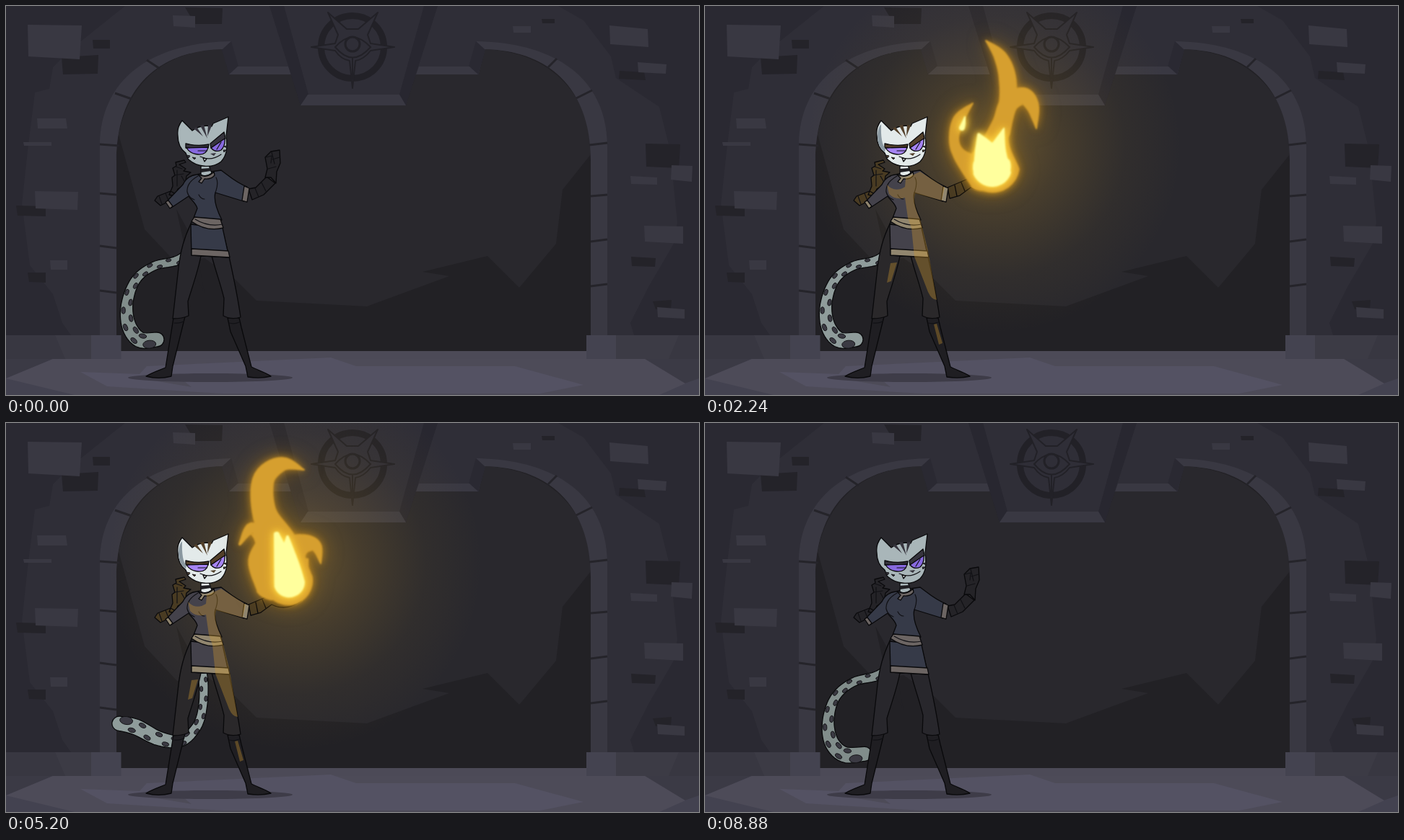
Recreate the animation shown at these times as an HTML page. Size 960 by 540 pixels, loop 8.96 s.

```html
<!DOCTYPE html>
<html lang="en">
<head>
<meta charset="utf-8">
<title>Fire spell</title>
<style>
html, body { margin: 0; width: 100%; height: 100%; overflow: hidden; background: #2f2e37; }
svg { display: block; width: 100vw; height: 100vh;
  --fur: #a9b6b9; --eye: #8769df; --cloth: #363a48; --trim: #6c6563;
  --glove: #242327; --mark: #36343d; --pants: #28272c; --tail: #818d8b; }
svg.lit { --fur: #e3eaea; --eye: #a684f4; --cloth: #44424b; --trim: #91866f;
  --glove: #493b22; --mark: #53402a; --pants: #2a282a; --tail: #8f9c9b; }
.lite { fill: #393842; } .dim { fill: #2a2932; } .dark { fill: #242329; }
.line { stroke: #09090b; stroke-width: 1.3; stroke-linejoin: round; stroke-linecap: round; }
.thin { fill: none; stroke: #111115; stroke-width: 1.2; stroke-linecap: round; }
.fur { fill: var(--fur); } .eye { fill: var(--eye); } .cloth { fill: var(--cloth); }
.trim { fill: var(--trim); } .glove { fill: var(--glove); } .mark { fill: var(--mark); }
.pants { fill: var(--pants); } .boot { fill: #1f1e22; } .tail { fill: var(--tail); }
#warm, #glow, #fire, #smoke { visibility: hidden; }
#flame { fill: #d69f2f; filter: blur(.8px) drop-shadow(0 0 5px #c58c1dcc) drop-shadow(0 0 12px #a9771599); }
#core { fill: #ffff9d; filter: blur(1px) drop-shadow(0 0 4px #ffe04a) drop-shadow(0 0 7px #ffc52d); }
</style>
</head>
<body>
<svg id="stage" viewBox="0 0 960 540" preserveAspectRatio="none">
<defs>
  <radialGradient id="halo">
    <stop offset="0" stop-color="#ffbe30" stop-opacity=".3"/>
    <stop offset=".35" stop-color="#f0b32c" stop-opacity=".15"/>
    <stop offset=".7" stop-color="#d8a82c" stop-opacity=".045"/>
    <stop offset="1" stop-color="#d8a82c" stop-opacity="0"/>
  </radialGradient>
</defs>

<g id="room">
  <path fill="#2f2e37" d="M0 0H960V540H0z"/>
  <path class="dim" d="M0 0H165L105 48 75 75 65 85 60 115 40 120 30 200 22 275 33 360 65 400 78 440 90 457H0zM765 0H960V457H870L865 440 890 390 925 330 930 300 920 200 905 140 845 100 838 70 800 20z"/>
  <path fill="#222125" d="M153 480V215C153 120 205 62 300 60L309 95H395L408 138H554L568 95H655L664 60C758 62 810 120 810 215V480z"/>
  <path fill="#29282d" d="M156 178C170 110 215 62 300 60L309 95H395L408 138H554L568 95H655L664 60C752 64 810 120 810 206L771 255 762 330 711 391 667 347 577 369 614 375 500 417 347 409 318 380 275 350 237 358 192 310z"/>
  <path fill="#222125" d="M236 282 262 330 275 398 253 360z"/>
  <g id="arch">
    <path class="lite" d="M130 457V195C130 108 192 51 312 49L300 60C205 62 153 120 153 215V457z"/>
    <path class="dim" d="M312 49 322 84 309 95 299 61z"/>
    <path class="lite" d="M321 84H391L395 95H309z"/>
  </g>
  <use href="#arch" transform="matrix(-1 0 0 1 963 0)"/>
  <path stroke="#25242a" stroke-width="3" d="M195 75 213 87M151 121 174 129M130 192 157 194M130 260 153 262M130 333 153 336M130 395 153 398M750 86 763 73M790 128 812 117M808 193 833 190M810 264 833 262M810 327 833 324M810 389 833 386"/>
  <path fill="#2f2e37" d="M385 0H579L545 123H418z"/>
  <path fill="#282730" d="M365 0H385L419 123 408 138zM579 0H598L554 138 545 123z"/>
  <path class="lite" d="M418 123H545L554 138H408z"/>
  <circle cx="480" cy="57" r="43.5" fill="none" stroke="#222127" stroke-width="9"/>
  <path fill="#2f2e37" stroke="#222127" stroke-width="2" stroke-linejoin="round" d="M423 57 456 52 460 40 446 9 472 32 488 32 515 9 501 40 505 52 538 57 505 62Q496 74 484 76L480 114 476 76Q464 74 456 62z"/>
  <path fill="none" stroke="#222127" stroke-width="2" d="M456 57Q480 30 505 57 480 86 456 57zM480 71V102"/>
  <circle cx="480" cy="53" r="10" fill="#2f2e37" stroke="#222127" stroke-width="3"/>
  <path class="dark" d="M77 71 128 68 127 94 79 95zM248 2 300 3 299 25 262 25zM120 47H144V59H121zM14 277 55 278V292L16 291zM30 370H55V384L32 383zM742 18H760V24H743zM850 90 884 92 886 103 849 101zM886 191 934 192 932 225 887 223zM866 348 900 350 899 362 867 361zM896 410 922 408 921 420 900 421z"/>
  <path class="lite" d="M30 26 105 27 102 74 31 70zM231 13 262 14V30L232 28zM43 156H83L85 170H44zM24 189H63V194H25zM40 257 100 258 99 283 41 281zM61 353H85V366H62zM702 28H727V37H703zM836 27 889 32 890 57 837 53z"/>
  <path class="lite" d="M875 78 915 81 914 94 876 92zM922 221 951 222 950 244 921 241zM865 236 902 238V248L866 247zM884 305 938 306V330L885 327zM902 418 940 421V434L903 432z"/>
  <path fill="#434250" d="M0 490H960V540H0z"/>
  <path fill="#383741" d="M0 457H130V490H0zM833 457H960V490H833z"/>
  <path fill="#3c3b45" d="M68 457H118V490H82zM845 457H932L918 490H845z"/>
  <path fill="#4c4a57" d="M159 479H804V491H159z"/>
  <path fill="#444350" d="M118 457H159.500V490H118zM804 457H845V490H804z"/>
  <path fill="#3b3a45" d="M0 490H65L0 517zM885 490H960V517L940 524z"/>
  <path fill="#4d4b58" d="M0 517 65 490H885L941 524 905 540H95z"/>
  <path fill="#545263" d="M103 508 185 511 195 500 450 488 485 500H705L800 526 740 538H300L140 528z"/>
  <path fill="#4d4b58" d="M210 521 247 521 257 529z"/>
  <ellipse cx="283" cy="516" rx="114" ry="6" fill="#3e3c48"/>
</g>

<circle id="glow" cx="400" cy="195" r="260" fill="url(#halo)"/>

<g id="smoke">
  <path id="ribbon" fill="#55505f"/>
  <g fill="#3d3848">
    <ellipse cx="337" cy="113" rx="29" ry="15" transform="rotate(32 337 113)"/>
    <ellipse cx="348" cy="89" rx="11" ry="7"/>
    <ellipse cx="371" cy="141" rx="14" ry="8" transform="rotate(25 371 141)"/>
    <ellipse cx="453" cy="82" rx="20" ry="13" transform="rotate(-35 453 82)"/>
    <ellipse cx="450" cy="43" rx="18" ry="10" transform="rotate(-35 450 43)"/>
    <ellipse cx="407" cy="50" rx="13" ry="5" transform="rotate(25 407 50)"/>
    <ellipse cx="447" cy="7" rx="19" ry="14"/>
    <ellipse cx="324" cy="8" rx="28" ry="10" transform="rotate(15 324 8)"/>
    <ellipse cx="396" cy="31" rx="5" ry="3"/>
  </g>
</g>

<path id="tail" class="tail line"/>
<path id="spots" fill="#3b3a43" stroke="#141417" stroke-width="1"/>

<g id="cat">
  <path class="boot line" d="M232 433 248 431 231 500 229 514C218 517 205 517 194 514 204 508 214 505 221 502zM307 433 323 433 326 446 340 501C350 506 360 509 367 514 355 517 342 516 335 515L332 500 311 452z"/>
  <path class="thin" d="M233 440Q242 441 247 437M309 440Q316 442 323 439"/>
  <path class="pants line" d="M259 296C247 320 241 340 238 372L231 434Q244 434 253 430L252 410C258 390 266 368 270 347L285 347C291 370 298 388 302 406L301 430Q312 436 325 432C321 404 315 375 309 348L298 303z"/>
  <path class="cloth line" d="M256 303 300 308 309 349 257 346z"/>
  <path class="trim line" d="M257 337 308 340 310 349 257 346z"/>
  <path class="glove line" d="M206 270 210 264 228 257 237 262 222 273 214 277zM226 262 231 250 230 238 234 235 231 225 236 222 235 217 247 214 249 217 240 220 249 226 246 229 256 231 250 236 248 248 238 254 234 264z"/>
  <path class="thin" d="M212 264 216 275M221 260 225 270M235 223 244 226M233 235 246 233M237 228V250M243 236 247 243"/>
  <g id="fist">
    <path class="glove line" d="M336 254 346 252 361 237 373 246 357 262 341 269z"/>
    <path class="glove line" d="M359 238 362 226 359 210 367 202 379 200 380 218 375 230 374 246 367 238z"/>
    <path class="thin" d="M345 253 350 265M354 245 360 257M360 210 368 208 367 218M368 203 372 219M379 210 369 213M363 226 374 223"/>
    <path id="soot" opacity="0" d="M346 252 361 237 362 226 359 208 367 201 379 200 380 218 375 230 375 246 357 262 350 264z"/>
  </g>
  <path id="open" class="glove line" d="M336 252 364 240Q385 250 405 242L409 247Q388 262 368 252L353 263 339 267zM346 249 349 264M355 245 360 257"/>
  <path class="cloth line" d="M264 234C254 235 249 240 245 248L222 272 229 280 253 264C256 269 263 273 265 281L260 294 299 297C292 283 287 270 290 259L329 271 334 251C320 246 310 237 298 228L284 230z"/>
  <path class="trim line" d="M221 272 225 270 231 278 227 281zM330 250 337 253 334 272 327 270zM261 293 297 296 301 308Q278 314 257 299z"/>
  <path class="thin" d="M262 296Q280 307 300 303M266 236Q250 245 251 258 253 266 261 269M267 262Q270 268 275 268M290 259Q295 246 291 238"/>
  <path class="fur line" d="M270 222 281 221 285 232Q277 238 270 234z"/>
  <path class="boot" d="M269 226 283 225 284 229 270 231z"/>
  <path class="trim line" d="M266 234Q279 240 288 230L289 235Q284 241 275 240L271 246 267 244 271 239z"/>
  <path class="fur line" d="M238 180C237 172 240 164 244 159L258 173Q270 164 285 167L287 163 308 154 305 180C307 197 306 207 298 216 286 226 263 224 252 212L249 204Q238 196 238 180z"/>
  <path class="mark" d="M260 170 264 168 273 181zM269 166 274 165 279 184zM280 165 285 166 279 181z"/>
  <path class="mark line" d="M249 191Q265 195 281 192L280 197 249 197zM283 191 302 175 304 184 284 197z"/>
  <path class="eye line" d="M250 197 280 196Q278 207 266 206 255 205 250 197zM284 197 303 184Q304 194 298 200 290 204 284 197z"/>
  <path class="thin" d="M266 201 278 201M292 199 298 189M269 209Q284 216 298 206"/>
  <path class="mark" d="M283 205 291 204 288 208z"/>
  <path class="mark" stroke="#19191c" d="M250 207 255 208 253 211zM258 210 263 211 261 213zM302 195 306 194V197zM301 200 305 200 302 203z"/>
  <path class="line" fill="#eef2f2" stroke-width=".8" d="M273 211 275 216 278 212z"/>
  <g id="warm">
    <path fill="#8a98a0" d="M239 181Q239 195 249 203L250 198Q243 191 244 164 239 169 239 181z"/>
    <path fill="#c9952f" fill-opacity=".36" d="M252 248Q263 260 277 251L278 239 298 230 332 252 328 270 291 260Q287 274 298 296L309 340 321 408Q314 408 309 397L290 348 286 308 281 294 277 266Q264 270 255 261zM257 357 266 356 258 382 252 384zM317 442 321 441 329 468 324 470z"/>
  </g>
</g>

<g id="fire"><g id="flame"></g><g id="core"></g><g id="embers" fill="#c28f26"></g></g>
</svg>

<script>
const LOOP = 8960, STEP = 80, TAIL_LOOP = 2240, FIRE_LOOP = 560;
const $ = id => document.getElementById(id);
const nums = text => text.split(/[ ,]+/).map(Number);
const clamp = v => Math.max(0, Math.min(1, v));
const mix = (a, b, u) => a + (b - a) * u;
const show = (id, on) => $(id).style.visibility = on ? 'visible' : 'hidden';

function addPath(parent) {
  const path = document.createElementNS('http://www.w3.org/2000/svg', 'path');
  return parent.appendChild(path);
}

const spline = (a, b, c, d, u) =>
  b + u / 2 * (c - a + u * (2 * a - 5 * b + 4 * c - d + u * (3 * (b - c) + d - a)));

// Points are [x, y, halfWidth]; u runs from 0 to 1 along the curve.
function along(points, u) {
  const last = points.length - 1;
  const i = Math.min(last - 1, Math.floor(u * last));
  const at = j => points[Math.max(0, Math.min(last, j))];
  return [0, 1, 2].map(k => spline(at(i - 1)[k], at(i)[k], at(i + 1)[k], at(i + 2)[k], u * last - i));
}

function frameAt(points, u) {
  const [x, y, w] = along(points, u);
  const p = along(points, Math.max(0, u - .01)), q = along(points, Math.min(1, u + .01));
  return { x, y, w: Math.max(.3, w), a: Math.atan2(q[1] - p[1], q[0] - p[0]) };
}

function ribbon(points, count = 36) {
  const rows = Array.from({ length: count + 1 }, (_, i) => frameAt(points, i / count));
  const side = s => rows.map(({ x, y, w, a }) =>
    `${(x - s * Math.sin(a) * w).toFixed(1)} ${(y + s * Math.cos(a) * w).toFixed(1)}`);
  const one = side(1), two = side(-1).reverse();
  const cap = (w, to) => `A${w} ${w} 0 0 0 ${to}`;
  return `M${one.join('L')}${cap(rows[count].w, two[0])}L${two.join('L')}${cap(rows[0].w, one[0])}Z`;
}

// Looping table of [time, values], read at time t.
function readLoop(keys, period, t, smooth) {
  const n = keys.length;
  let i = keys.findLastIndex(k => k[0] <= t);
  if (i < 0) i = n - 1;
  const at = j => keys[(j + n) % n];
  const gap = (at(i + 1)[0] - at(i)[0] + period) % period;
  const u = ((t - at(i)[0] + period) % period) / gap;
  return at(i)[1].map((v, k) => smooth
    ? spline(at(i - 1)[1][k], v, at(i + 1)[1][k], at(i + 2)[1][k], u)
    : mix(v, at(i + 1)[1][k], u));
}

const tailKeys = [
  [0, '240 352 205 361 180 380 168 412 170 443 185 463 209 463'],
  [160, '242 355 210 368 184 392 169 422 163 448 165 465 172 470'],
  [320, '252 362 232 388 208 410 185 430 165 445 151 451 141 449'],
  [480, '266 358 258 390 238 416 210 430 182 432 160 430 139 428'],
  [720, '273 355 273 390 265 420 243 441 212 438 180 422 156 417'],
  [960, '276 355 282 390 276 425 255 446 230 451 206 442 186 431'],
  [1280, '258 340 247 370 245 402 254 428 259 454 251 480 237 493'],
  [1600, '246 327 223 345 213 372 217 402 238 427 260 450 256 489'],
  [1680, '246 325 220 341 209 370 213 402 232 425 256 446 256 477'],
  [2000, '242 344 210 356 187 382 182 412 190 440 212 453 242 455']
].map(([t, text]) => [t, nums(text)]);
const tailWidths = [7, 6.5, 6, 6.5, 8, 10, 11, 10];

function drawTail(t) {
  const v = readLoop(tailKeys, TAIL_LOOP, t % TAIL_LOOP, true);
  const points = tailWidths.map((w, i) => i ? [v[i * 2 - 2], v[i * 2 - 1], w] : [266, 330, w]);
  $('tail').setAttribute('d', ribbon(points, 48));
  let d = '';
  for (let i = 0; i < 16; i++) {
    const { x, y, w, a } = frameAt(points, .15 + i * .052);
    const off = (i % 2 ? .52 : -.55) * w, big = i === 15;
    const rx = big ? 9 : 3.6 + i * .12, ry = big ? 5.5 : 2 + i * .07;
    const cx = x - Math.sin(a) * off, cy = y + Math.cos(a) * off;
    const dx = Math.cos(a) * rx, dy = Math.sin(a) * rx;
    const arc = `a${rx} ${ry} ${a * 180 / Math.PI} 1 0 `;
    d += `M${cx - dx} ${cy - dy}${arc}${2 * dx} ${2 * dy}${arc}${-2 * dx} ${-2 * dy}`;
  }
  $('spots').setAttribute('d', d);
}

const tongues = [];
function tongue(parent, first, second, third) {
  const keys = [[0, nums(first)], [160, nums(second)], [480, nums(third)]];
  tongues.push({ path: addPath($(parent)), keys });
}
tongue('flame',
  '385 234 24, 354 208 10, 345 185 7, 352 157 8, 371 135 1',
  '370 218 28, 352 192 17, 355 165 10, 340 146 8, 324 168 2',
  '380 228 24, 349 210 12, 342 188 9, 349 171 9, 365 151 1');
tongue('flame',
  '398 221 38, 404 184 17, 418 140 12, 419 100 12, 409 70 9, 389 48 1',
  '391 219 34, 381 170 24, 358 125 17, 357 78 15, 383 57 10, 413 65 1',
  '399 225 32, 403 185 19, 417 142 14, 407 100 14, 396 68 8, 384 43 1');
tongue('flame',
  '410 174 13, 420 137 13, 441 125 12, 454 140 9, 459 170 1',
  '395 215 24, 398 180 22, 413 168 14, 430 172 8, 436 195 1',
  '404 188 13, 419 151 16, 441 139 13, 454 157 9, 456 195 1');
tongue('core',
  '397 224 27, 387 197 14, 379 178 2',
  '392 222 21, 385 195 14, 375 155 4',
  '397 221 27, 378 192 13, 348 186 3');
tongue('core',
  '398 224 27, 406 196 11, 414 170 1',
  '393 222 21, 391 195 15, 390 158 2',
  '398 222 27, 407 195 12, 421 175 1');
tongue('core',
  '356 169 4, 358 163 3, 360 154 1',
  '381 205 5, 380 200 5, 382 192 3',
  '422 149 4, 420 144 5, 419 138 2');

// Sparks thrown off by the ignition: x, y at 1600 ms, drift, size.
const sparks = [[374, 30, -.02, 5], [347, 0, -.06, 4], [390, 84, -.01, 4], [578, 12, .1, 4]]
  .map(spark => ({ spark, path: addPath($('embers')) }));

function fireSize(t) {
  const keys = [[640, 0], [800, 1.3], [960, 1.2], [1200, 1], [5600, 1], [5680, 1.1], [5840, 0]];
  const i = keys.findLastIndex(k => k[0] <= t);
  if (i < 0 || i === keys.length - 1) return 0;
  const [a, b] = [keys[i], keys[i + 1]];
  return mix(a[1], b[1], (t - a[0]) / (b[0] - a[0]));
}

function drawFire(t) {
  const size = fireSize(t), lit = size > 0;
  $('stage').classList.toggle('lit', lit);
  ['fire', 'glow', 'warm'].forEach(id => show(id, lit));
  $('glow').style.opacity = Math.min(1, size);
  $('fire').setAttribute('transform', `translate(395 240) scale(${size}) translate(-395 -240)`);
  for (const { path, keys } of tongues) {
    const v = readLoop(keys, FIRE_LOOP, t % FIRE_LOOP, false);
    const points = [];
    for (let i = 0; i < v.length; i += 3) points.push(v.slice(i, i + 3));
    path.setAttribute('d', ribbon(points));
  }
  for (const { spark: [x0, y0, drift, r], path } of sparks) {
    const age = t - 1600, x = x0 + age * drift, y = y0 - age * .2;
    path.setAttribute('d', age > -640 && age < 400
      ? ribbon([[x - 2, y - 9, 1], [x, y, r - 1], [x + 1, y + 6, r - 1.5]], 10) : '');
  }
}

const smokePoints = [
  [382, 216, 24], [371, 200, 21], [399, 180, 15], [410, 158, 14], [386, 139, 14], [342, 119, 23],
  [330, 95, 21], [372, 80, 12], [420, 80, 17], [450, 70, 22], [432, 40, 31], [439, 10, 30],
  [370, 4, 20], [318, 6, 22], [300, -20, 20]];

function drawSmoke(t) {
  const on = t >= 5760 && t < 8800;
  show('smoke', on);
  $('soot').setAttribute('opacity', t >= 5760 ? clamp((7500 - t) / 800) : 0);
  if (!on) return;
  const grow = clamp((t - 5700) / 640), late = Math.max(0, t - 6960);
  const thin = 1 - clamp(late / 2600);
  $('ribbon').setAttribute('d', ribbon(smokePoints.map(([x, y, w], i) =>
    [x + Math.sin(i + late / 420) * Math.min(8, late / 60) - Math.sin(i) * Math.min(8, late / 60), y, w * thin]), 90));
  $('smoke').setAttribute('transform',
    `translate(378 ${222 - late * .14}) scale(${grow * mix(.65, 1, thin)} ${grow}) translate(-378 -222)`);
}

function draw() {
  const t = Math.floor(performance.now() % LOOP / STEP) * STEP;
  const open = t >= 560 && t < 5760;
  show('open', open);
  $('fist').style.display = open ? 'none' : '';
  drawTail(t);
  drawFire(t);
  drawSmoke(t);
  requestAnimationFrame(draw);
}
draw();
</script>
</body>
</html>
```
